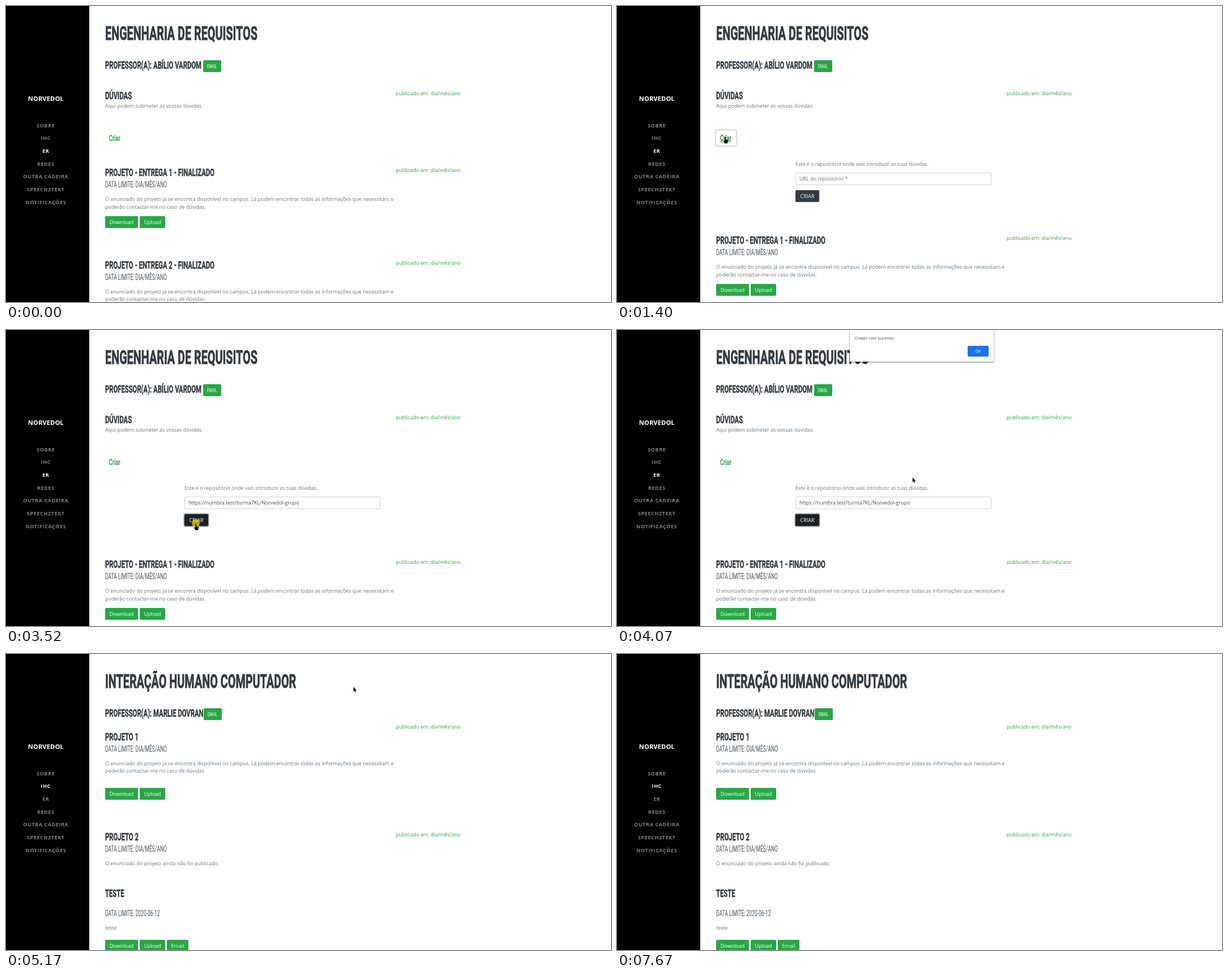
An HTML page that plays this animation: 1068 px wide and 524 px high, repeating every 8120 ms.

```html
<!DOCTYPE html>
<html lang="pt">
<head>
<meta charset="utf-8">
<title>Página da cadeira</title>
<style>
html, body { margin: 0; width: 100%; height: 100%; overflow: hidden; background: #fff; }
#stage { position: relative; width: 1068px; height: 524px; overflow: hidden; font: 8.96px/20px "Open Sans", "Noto Sans", sans-serif; color: #6c757d; }
#stage div { position: absolute; white-space: nowrap; box-sizing: border-box; }
#stage [hidden] { display: none; }
.layer { left: 0; top: 0; width: 1068px; height: 524px; }
#side { left: 0; top: 0; width: 147px; height: 524px; background: #000; }
#side div { left: 0; width: 140.5px; text-align: center; font-weight: 700; font-size: 9px; letter-spacing: .6px; color: #808080; }
#side .brand { font-size: 11.3px; letter-spacing: 0; color: #fff; }
#side .on { color: #fff; }
/* one narrow display face shared by all headings */
.h1, .h2, .sub, .link, .tag { font-family: Roboto, "Liberation Sans", sans-serif; transform: scaleX(.6); transform-origin: 0 50%; }
.h1, .h2 { font-weight: 700; color: #343a40; -webkit-text-stroke: .025em #343a40; }
.h1 { font-size: 33px; }
.h2 { font-size: 18.8px; }
.sub { font-size: 14.2px; color: #495057; }
.link { font-size: 15px; font-weight: 600; color: #28a745; }
.link.hover { color: #1e8438; text-decoration: underline; }
.tag { font-size: 9.8px; color: #fff; }
.date { color: #28a745; }
.btn { border-radius: 2px; background: #28a745; color: #fff; text-align: center; }
.ring { border-radius: 3px; box-shadow: 0 0 0 1.8px rgba(225, 80, 50, .3); }
#clip { left: 300px; top: 262px; width: 380px; overflow: hidden; }
#form { left: -300px; top: -262px; width: 700px; height: 400px; }
#field { left: 315px; top: 295px; width: 346px; height: 22px; border: 1px solid #ced4da; border-radius: 2px; }
#field.focus { border-color: #dfa995; box-shadow: 0 0 0 1.8px rgba(189, 93, 56, .27); }
#caret { top: 300px; width: 1px; height: 12px; background: #495057; }
#send { background: #343a40; }
#send.hover { background: #23272b; }
#send.pressed { background: #1d2124; box-shadow: 0 0 0 1.8px rgba(82, 98, 103, .5); }
#dialog { left: 411px; top: -20px; width: 254px; height: 76px; background: #fff; border-radius: 2px; box-shadow: 0 1px 3px rgba(0, 0, 0, .55); }
#dialog .msg { left: 9px; top: 24px; font-size: 7.2px; color: #444; }
#ok { left: 208px; top: 48px; width: 37px; height: 19px; line-height: 19px; font-size: 7px; background: #1a73e8; }
#ok.hover { background: #5a94e2; }
#halo { width: 14px; height: 14px; margin: -7px; border-radius: 50%; background: rgba(255, 235, 0, .65); }
#pointer { position: absolute; left: 0; top: 0; overflow: visible; }
</style>
</head>
<body>
<div id="stage">
  <div id="side"></div>
  <div id="er" class="layer">
    <div id="clip"><div id="form">
      <div id="field"></div>
      <div id="caret"></div>
    </div></div>
    <div id="lower" class="layer"></div>
  </div>
  <div id="ihc" class="layer"></div>
  <div id="dialog">
    <div class="msg">Criado com sucesso!</div>
    <div id="ok" class="btn">OK</div>
  </div>
  <div id="halo"></div>
  <svg id="pointer" width="10" height="14">
    <path id="shape" stroke="#fff" stroke-width=".4"/>
  </svg>
</div>
<script>
const LOOP = 8120;
const $ = id => document.getElementById(id);

function add(parent, cls, left, top, text) {
  const el = document.createElement('div');
  el.className = cls;
  el.style.left = left + 'px';
  el.style.top = top + 'px';
  el.textContent = text;
  parent.append(el);
  return el;
}

// y is the vertical middle of the text
const put = (parent, cls, x, y, text) => add(parent, cls, x, y - 10, text);

function button(parent, x, y, width, text) {
  const el = add(parent, 'btn', x, y, text);
  el.style.width = width + 'px';
  el.style.height = el.style.lineHeight = '21px';
  return el;
}

function actions(parent, y, withMail) {
  button(parent, 175, y, 58, 'Download');
  button(parent, 236, y, 45, 'Upload');
  if (withMail) button(parent, 284, y, 38, 'Email');
}

function header(page, title, teacher, mailX) {
  put(page, 'h1', 175, 48.5, title);
  put(page, 'h2', 175, 105, 'PROFESSOR(A): ' + teacher);
  button(page, mailX, 96, 32, '');
  put(page, 'tag', mailX + 7, 107, 'EMAIL');
}

const published = (page, y) => put(page, 'date', 688, y, 'publicado em: dia/mês/ano');

function project(page, y, title, lines, limit = 'DIA/MÊS/ANO') {
  put(page, 'h2', 175, y, title);
  put(page, 'sub', 175, y + 21, 'DATA LIMITE: ' + limit);
  lines.forEach((line, i) => put(page, '', 175, y + 47.3 + i * 13.6, line));
}

const brief = end => [
  'O enunciado do projeto já se encontra disponível no campus. Lá podem encontrar todas as informações que necessitam e',
  'poderão contactar-me no caso de dúvidas' + end
];

// Sidebar
const side = $('side');
put(side, 'brand', 0, 163.5, 'NORVEDOL');
const nav = ['SOBRE', 'IHC', 'ER', 'REDES', 'OUTRA CADEIRA', 'SPEECH2TEXT', 'NOTIFICAÇÕES']
  .map((name, i) => put(side, '', 0, 211.5 + i * 22.7, name));

// Requirements page
const er = $('er'), lower = $('lower'), form = $('form');
header(er, 'ENGENHARIA DE REQUISITOS', 'ABÍLIO VARDOM', 348);
put(er, 'h2', 175, 159, 'DÚVIDAS');
published(er, 155);
put(er, '', 175, 176.5, 'Aqui podem submeter as vossas dúvidas.');
const ring = add(er, 'ring', 175, 220, '');
ring.style.width = '35px';
ring.style.height = '27px';
const create = put(er, 'link', 182, 233.5, 'Criar');

put(form, '', 315, 279.5, 'Este é o repositório onde vais introduzir as tuas dúvidas.');
const hint = put(form, '', 322, 306, 'URL do repositório *');
const url = put(form, '', 322, 306, 'https://numbra.test/turma7KL/Norvedol-grupo');
url.style.color = '#495057';
const send = button(form, 315, 326, 42, 'CRIAR');
send.id = 'send';

project(lower, 295, 'PROJETO - ENTREGA 1 - FINALIZADO', brief('.'));
published(lower, 291);
actions(lower, 372);
project(lower, 458.5, 'PROJETO - ENTREGA 2 - FINALIZADO', brief(''));
published(lower, 454.5);

// Interaction page
const ihc = $('ihc');
header(ihc, 'INTERAÇÃO HUMANO COMPUTADOR', 'MARLIE DOVRAN', 349);
published(ihc, 129);
project(ihc, 146.5, 'PROJETO 1', brief(''));
actions(ihc, 237);
published(ihc, 319.5);
project(ihc, 323.5, 'PROJETO 2', ['O enunciado do projeto ainda não foi publicado.']);
put(ihc, 'h2', 175, 424.3, 'TESTE');
put(ihc, 'sub', 175, 458.5, 'DATA LIMITE: 2020-06-12');
put(ihc, '', 175, 485, 'teste');
actions(ihc, 506, true);

// Pointer outlines, drawn from the hot spot
const SHAPES = {
  arrow: 'M0 0V9L2 7.2L3.5 10.4L5 9.7L3.6 6.6H6.3Z',
  hand: 'M-1 1Q0-.8 1 1V5L4 5.6Q5.4 6 5.2 8L4 12.4H-.6L-3.6 7.8Q-3.4 6.2-1 7.6Z',
  beam: 'M-2.6-5H-.4L0-4.6L.4-5H2.6V-4H.6V4H2.6V5H.4L0 4.6L-.4 5H-2.6V4H-.6V-4H-2.6Z'
};

// time, x, y, shape from then on
const PATH = [
  [0, 936, 500, ''], [70, 936, 500, 'arrow'], [130, 540, 400, 'arrow'],
  [200, 167, 309, 'arrow'], [380, 167, 309, 'arrow'], [700, 56, 262, 'arrow'],
  [900, 62, 209, 'arrow'], [1050, 130, 224, 'arrow'], [1230, 191, 231, 'hand'],
  [1640, 191, 231, 'hand'], [1790, 216, 250, 'arrow'], [2030, 332, 298, 'beam'],
  [2110, 352, 304, 'beam'], [2560, 352, 304, 'beam'], [2720, 344, 320, 'arrow'],
  [2800, 338, 332, 'hand'], [2970, 335, 342, 'hand'], [3640, 335, 342, 'hand'],
  [3760, 352, 386, 'arrow'], [3900, 410, 350, 'arrow'], [4130, 560, 230, 'arrow'],
  [4210, 560, 230, 'arrow'], [4690, 642, 30, 'arrow'], [4850, 642, 30, 'arrow'],
  [5090, 614, 57, 'arrow'], [5170, 614, 57, 'arrow'], [5390, 431, 279, 'arrow'],
  [5480, 431, 279, 'arrow'], [5710, 411, 295, 'arrow'], [6170, 411, 295, 'arrow'],
  [6420, 857, 335, 'arrow'], [6490, 857, 335, ''], [7420, 978, 445, 'arrow'],
  [7600, 1030, 512, 'arrow'], [7670, 1030, 512, '']
];
const CLICKS = [[1310, 1390], [2110, 2190], [3520, 3640], [4740, 4850]];

function pointerAt(t) {
  let i = PATH.length - 1;
  while (PATH[i][0] > t) i--;
  const a = PATH[i], b = PATH[i + 1] || a;
  const k = a === b ? 0 : (t - a[0]) / (b[0] - a[0]);
  return { x: a[1] + (b[1] - a[1]) * k, y: a[2] + (b[2] - a[2]) * k, shape: a[3] };
}

function draw(t) {
  const within = (from, to) => t >= from && t < to;
  const second = t >= 5170;
  er.hidden = second;
  ihc.hidden = !second;
  nav[1].className = second ? 'on' : '';
  nav[2].className = second ? '' : 'on';

  const open = t < 1310 ? 0 : t < 1390 ? 60 : 120;
  $('clip').style.height = open + 'px';
  lower.style.transform = `translateY(${open}px)`;
  create.classList.toggle('hover', within(1200, 1710));
  ring.hidden = !within(1310, 2110);

  const pasted = t >= 2560;
  $('field').className = within(2110, 3520) ? 'focus' : '';
  hint.hidden = pasted;
  url.hidden = !pasted;
  $('caret').hidden = !within(2110, 2970);
  $('caret').style.left = (pasted ? 322 + url.offsetWidth : 322) + 'px';
  send.classList.toggle('hover', within(2800, 3520));
  send.classList.toggle('pressed', t >= 3520);

  $('dialog').hidden = !within(3690, 5010);
  $('ok').classList.toggle('hover', t >= 4650);

  const p = pointerAt(t);
  $('pointer').style.display = p.shape ? '' : 'none';
  $('pointer').style.transform = `translate(${p.x}px, ${p.y}px)`;
  $('shape').setAttribute('d', SHAPES[p.shape] || '');
  $('halo').hidden = !CLICKS.some(([from, to]) => within(from, to));
  $('halo').style.left = p.x + 'px';
  $('halo').style.top = p.y + 'px';
}

const start = performance.now();
function tick() {
  draw((performance.now() - start) % LOOP);
  requestAnimationFrame(tick);
}
tick();
</script>
</body>
</html>
```
